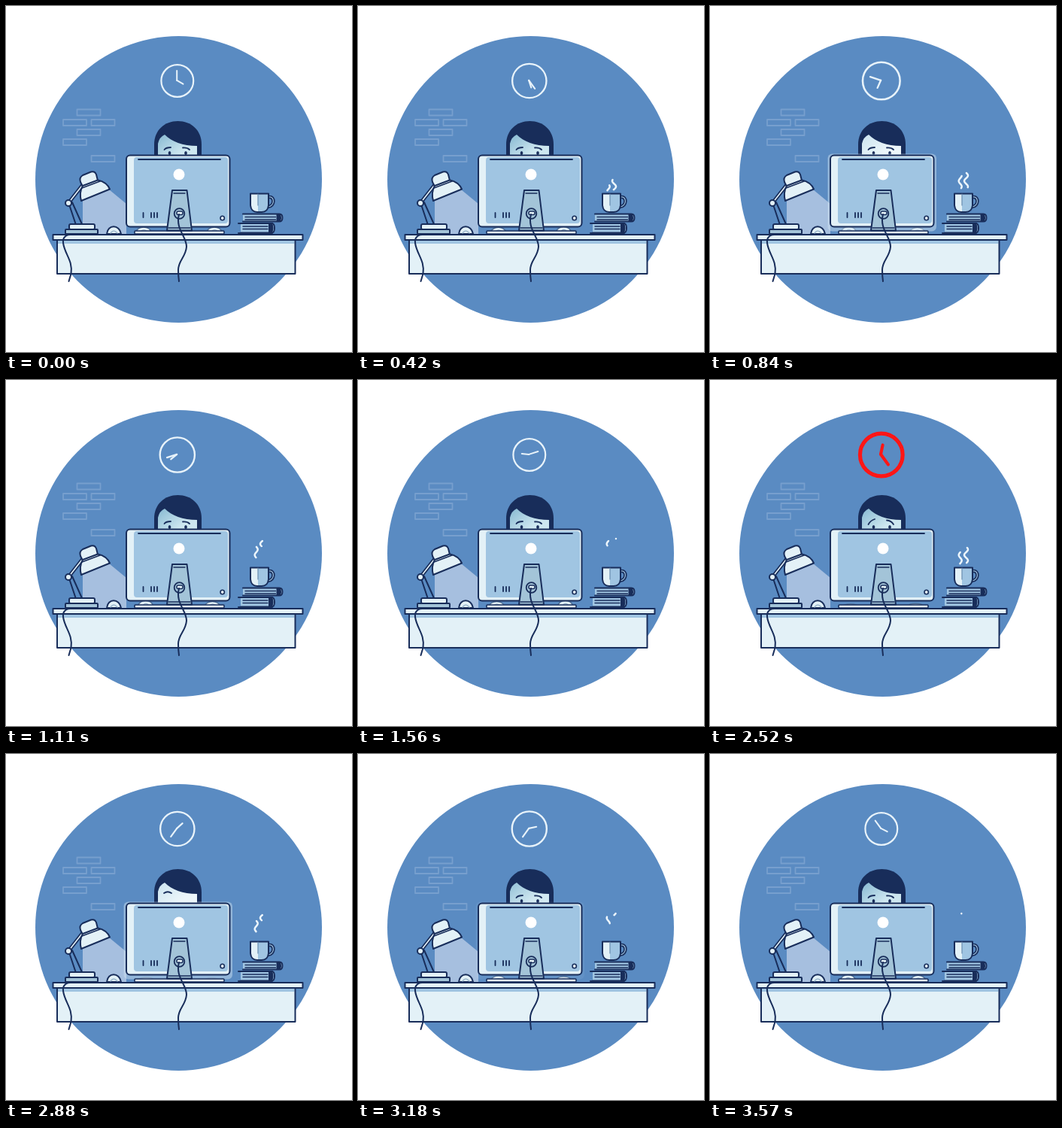
An HTML page with a canvas that plays this animation: 460 px wide and 460 px high, repeating every 3.6 s.

```html
<!DOCTYPE html>
<html lang="en">
<head>
<meta charset="utf-8">
<style>
html, body { margin: 0; width: 100%; height: 100%; overflow: hidden; background: #fff; }
canvas { display: block; width: 460px; height: 460px; }
</style>
</head>
<body>
<canvas id="stage" width="460" height="460"></canvas>
<script>
const ctx = document.getElementById('stage').getContext('2d');
const LOOP = 3600, TAU = Math.PI * 2;
const NAVY = '#182d5a', PALE = '#e3f1f7', SKY = '#a0c5e2', BLUE = '#5a8bc2', STEEL = '#a3c4d8';

const clamp = v => Math.max(0, Math.min(1, v));
const mix = (a, b, k) => a + (b - a) * k;
const ease = k => k * k * (3 - 2 * k);
const blend = (a, b, k) => `rgb(${a.map((v, i) => Math.round(mix(v, b[i], k)))})`;

// Smooth interpolation through [time, value] pairs
function track(keys, t) {
  if (t <= keys[0][0]) return keys[0][1];
  for (let i = 1; i < keys.length; i++) {
    const [t0, v0] = keys[i - 1], [t1, v1] = keys[i];
    if (t <= t1) return mix(v0, v1, ease((t - t0) / (t1 - t0)));
  }
  return keys[keys.length - 1][1];
}

function paint(fill, stroke, width = 2) {
  if (fill) { ctx.fillStyle = fill; ctx.fill(); }
  if (stroke) { ctx.strokeStyle = stroke; ctx.lineWidth = width; ctx.stroke(); }
}
function box(x, y, w, h, r, fill, stroke, width) {
  ctx.beginPath();
  ctx.roundRect(x, y, w, h, r);
  paint(fill, stroke, width);
}
function disc(x, y, r, fill, stroke, width) {
  ctx.beginPath();
  ctx.arc(x, y, r, 0, TAU);
  paint(fill, stroke, width);
}
function shape(d, fill, stroke, width = 2) {
  const p = new Path2D(d);
  if (fill) { ctx.fillStyle = fill; ctx.fill(p); }
  if (stroke) { ctx.strokeStyle = stroke; ctx.lineWidth = width; ctx.stroke(p); }
}

function backdrop() {
  ctx.fillStyle = '#fff';
  ctx.fillRect(0, 0, 460, 460);
  disc(229.5, 230.5, 190.5, BLUE);
  for (const [x, y] of [[94.5, 137.5], [76, 151], [113.5, 151], [94.5, 164], [76, 177], [113.5, 199]])
    box(x, y, 31, 8, 0, null, '#779fce', 1.8);
}

const CLOCK_SCALE = [[300, 1], [540, 1.12], [720, 1.18], [840, 1.16], [1110, 1.08], [1260, 1],
  [2220, 1], [2490, 1.34], [2550, 1.31], [2730, 1.18], [2880, 1.06], [3000, 1], [3200, 1.08], [3400, 1]];

function clock(t) {
  const scale = track(CLOCK_SCALE, t);
  const alarm = clamp((scale - 1.19) / 0.1);
  const color = blend([232, 243, 250], [255, 22, 22], alarm);
  const hand = (angle, length) =>
    `M0 0L${length * Math.sin(angle)} ${-length * Math.cos(angle)}`;
  ctx.save();
  ctx.translate(227.8, 99.5);
  ctx.scale(scale, scale);
  disc(0, 0, 21.4, null, color, mix(2.2, 3.9, alarm));
  ctx.translate(-0.6, -0.6);
  const width = mix(2, 3.1, alarm);
  shape(hand(TAU * (1 / 3 + t / LOOP), 9.5), null, color, width);
  shape(hand(TAU * t / 300, 12.8), null, color, width);
  ctx.restore();
}

function lamp() {
  shape('M102 257L137 244L160 263V303H102Z', '#a6bfdf');
  shape('M84 264L93 291M88 261L101 290', null, NAVY, 2);
  shape('M83 262L101 239', null, NAVY, 5);
  shape('M83 262L101 239', null, PALE, 1.6);
  disc(83, 262, 4, PALE, NAVY);
  box(84, 290, 34, 7, 2, PALE, NAVY);
  box(79, 297, 43, 6, 1, STEEL, NAVY);
  shape('M99 234Q97 228 102 225L113 220.5Q118 219 120 224L122 232L102 240Z', PALE, NAVY);
  shape('M102 239L122 231.5Q134 234 138 243.5L100 259Q97 248 102 239Z', PALE, NAVY);
  shape('M101 242L125 233', null, NAVY, 1.6);
}

function head(t, glow) {
  const turned = t >= 2700 && t < 3150;
  const frown = track([[2160, 0], [2340, 1], [2640, 1], [2700, 0]], t);
  ctx.save();
  shape('M197 200V184C197 165 211 153 228.5 153S260 165 260 184V200Z', NAVY);
  const skin = ctx.createLinearGradient(205, 174, 226, 200);
  skin.addColorStop(0, blend([143, 190, 213], [207, 230, 241], glow));
  skin.addColorStop(1, blend([205, 231, 240], [236, 246, 250], glow));
  shape('M202 200V183Q204 174 211 171C220 180 235 186 254 186V200Z', skin);
  if (turned) {
    shape('M210 185Q215 181.5 220 185', null, NAVY, 1.8);
  } else {
    shape(`M210.5 ${191 + frown}Q213 ${188 - frown} 219 ${188 - 3 * frown}`, null, NAVY, 1.8);
    shape(`M235 ${188.5 - 2 * frown}Q241 ${188 - frown} 244 ${191 + frown}`, null, NAVY, 1.8);
    for (const x of [217.5, 239]) {
      ctx.beginPath();
      ctx.ellipse(x, 195.5, 1.8, 2.6, 0, 0, TAU);
      paint(NAVY);
    }
  }
  ctx.restore();
}

function typing(t) {
  const lift = track([[0, 0], [2300, 0], [2460, 5], [3100, 5], [3250, 0]], t);
  const beat = TAU * t / 300;
  const dome = (x, y) => {
    shape(`M${x - 10} 301C${x - 9} ${y - 2} ${x + 9} ${y - 2} ${x + 10} 301Z`, PALE, '#4c6c94', 1.5);
    shape(`M${x - 4} 300Q${x} ${y + 2} ${x + 5} 300`, null, '#819fbb', 1.2);
  };
  dome(185 - 2 * Math.cos(beat), 293.5 + lift + Math.sin(beat));
  dome(275 + 2 * Math.cos(beat), 293.5 + lift - Math.sin(beat));
}

function monitor(glow) {
  if (glow > 0) {
    ctx.save();
    ctx.globalAlpha = 0.48 * glow;
    box(156.5, 196.5, 144.5, 103, 6, '#cfe2f1');
    ctx.restore();
  }
  box(171, 299, 119, 4, 1, PALE, NAVY, 1.6);
  box(160, 198.5, 137.5, 95, 5, PALE);
  box(170, 201, 125, 88, 4, SKY);
  box(160, 198.5, 137.5, 95, 5, null, NAVY);
  shape('M176 204H285', null, NAVY, 1.8);
  disc(230, 224, 7.5, '#fff');
  shape('M182.5 275V281M193 275V281M197 275V281M201 275V281', null, NAVY, 1.8);
  disc(287.7, 282, 2.7, PALE, NAVY, 1.6);
  shape('M221 245H240.5L247 298.5H214Z', STEEL, NAVY);
  shape('M223 249H238M216 295H245', null, NAVY, 1.4);
  disc(230.5, 276, 6.8, STEEL, NAVY, 1.8);
  box(227, 273, 8, 4.5, 2, PALE, NAVY, 1.5);
}

function desk() {
  box(68, 311, 316.5, 45, 0, PALE);
  box(69, 311, 314.5, 5, 0, SKY);
  box(68, 311, 316.5, 45, 0, null, NAVY);
  box(62.5, 304, 332, 7, 0, PALE, NAVY);
  shape('M91 304C79 303 75 308 76 315C78 330 89 338 86.5 356L83.5 366', null, NAVY);
  shape('M230 277C225 297 240 306 240 320C239 334 229 338 229 351Q229 359 230 366', null, NAVY);
}

function book(x, y, w, h) {
  shape(`M${x} ${y}H${x + w - 4}Q${x + w} ${y} ${x + w} ${y + h / 2}T${x + w - 4} ${y + h}H${x}`, SKY, NAVY);
  shape(`M${x + 3} ${y + 4}H${x + w - 9}M${x + 3} ${y + 7.5}H${x + w - 9}`, null, NAVY, 1.4);
  shape(`M${x + w - 8} ${y}H${x + w - 3}Q${x + w} ${y + h / 2} ${x + w - 3} ${y + h}H${x + w - 8}Z`, NAVY);
}

function props() {
  shape('M134 303C135 290 151 290 153 303Z', PALE, NAVY);
  shape('M139 302Q143 296 148 302', null, '#9db9ce', 1.4);
  book(312, 289, 45, 12.5);
  shape('M309 289H354M309 302H354', null, NAVY);
  book(315, 276.5, 52.5, 10);
  shape('M350 254C357 253 358 266 348 267', null, NAVY, 4.6);
  shape('M350 254C357 253 358 266 348 267', null, SKY, 1.2);
  const cup = 'M325 249.5H349V265Q348 274 340 274H334Q326 274 325 265Z';
  shape(cup, PALE);
  shape('M335 250H349V265Q348 274 340 274H335Z', SKY);
  shape(cup, null, NAVY);
  shape('M335 250V265', null, '#688caf', 1.2);
}

const STEAM = [
  { x: 332.7, sway: 2,
    top: [[120, 247], [180, 245], [720, 229], [840, 226], [1080, 222], [1560, 214], [1770, 212]],
    tail: [[120, 247], [180, 246], [720, 244], [840, 242], [1080, 236], [1560, 220], [1770, 212]],
    from: 120, to: 1790 },
  { x: 340.5, sway: 2.5,
    top: [[60, 247], [180, 237], [720, 223], [840, 222], [1080, 214], [1560, 211]],
    tail: [[60, 247], [180, 245], [720, 243], [840, 241], [1080, 221], [1560, 211]],
    from: 60, to: 1580 }
];

function steam(t) {
  for (const s of STEAM) {
    if (t < s.from || t > s.to) continue;
    const top = track(s.top, t), tail = track(s.tail, t);
    ctx.beginPath();
    for (let i = 0; i <= 24; i++) {
      const y = mix(tail, top, i / 24) - (i ? 0 : -0.1);
      ctx.lineTo(s.x + s.sway * Math.cos(TAU * (y - 240) / 14.7), y);
    }
    paint(null, '#edf6fc', 2.5);
  }
}

const GLOW = [[570, 0], [780, 1], [900, 1], [1080, 0], [2700, 0], [2820, 1], [3000, 1], [3240, 0]];

function render(t) {
  const glow = track(GLOW, t);
  ctx.lineCap = ctx.lineJoin = 'round';
  backdrop();
  clock(t);
  lamp();
  head(t, glow);
  typing(t);
  monitor(glow);
  props();
  desk();
  steam(t % 1800);
}

const start = performance.now();
function tick(now) {
  const elapsed = Math.max(0, now - start) % LOOP;
  render(Math.floor(elapsed / 30) * 30);
  requestAnimationFrame(tick);
}
render(0);
requestAnimationFrame(tick);
</script>
</body>
</html>
```
